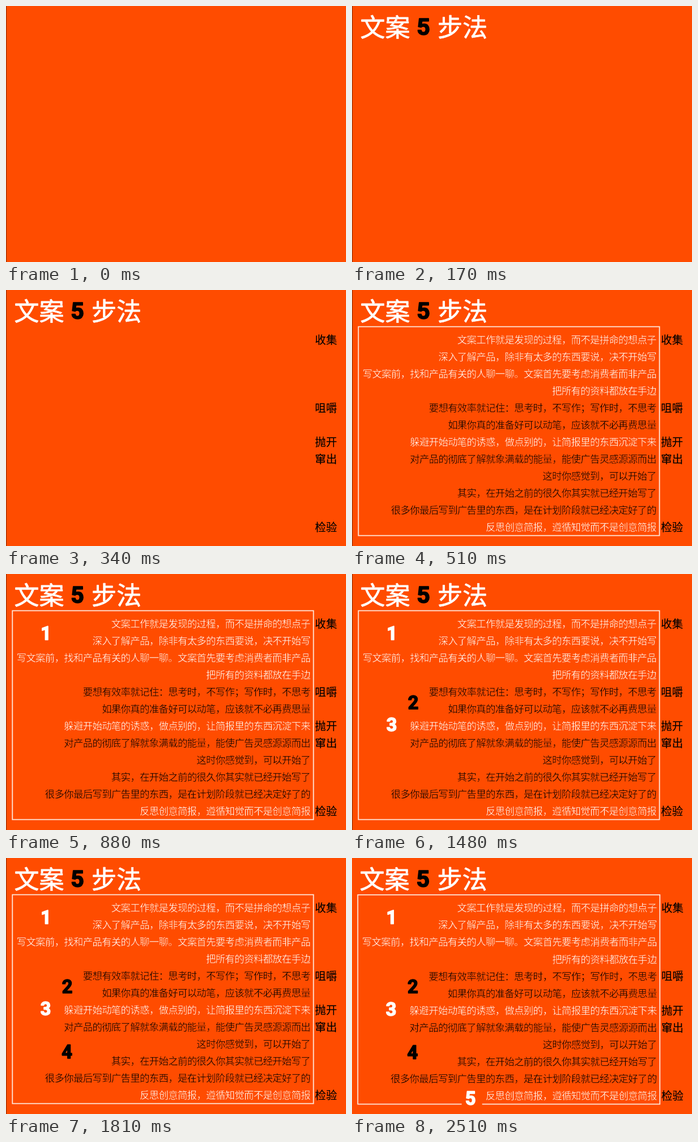
These frames come from a looping animation (600 px wide and 451 px high, 3.51 s). An HTML page:

```html
<!DOCTYPE html>
<html lang="zh-CN">
<head>
<meta charset="utf-8">
<style>
  html, body { margin: 0; width: 100%; height: 100%; overflow: hidden; background: #ff4c00; }
  svg { display: block; width: 600px; height: 451px; }
  text { font-family: "Noto Sans CJK SC", "Noto Sans CJK", sans-serif; stroke-linejoin: round; }
  .title { font-size: 44px; fill: #fff; stroke: #fff; stroke-width: .8; }
  .label { font-size: 19.4px; stroke: #000; stroke-width: .15; }
  /* An outline in the background colour thins the strokes */
  .row { font-size: 17.4px; letter-spacing: -.67px; text-anchor: end; stroke: #ff4c00; stroke-width: .4; }
  .digit { font-family: Roboto, sans-serif; font-weight: 700; text-anchor: middle; stroke-width: 1.6; }
</style>
</head>
<body>
<svg viewBox="0 0 600 451"></svg>
<script>
const LOOP = 3510, LAST = 2510;
const rows = [
  '文案工作就是发现的过程，而不是拼命的想点子',
  '深入了解产品，除非有太多的东西要说，决不开始写',
  '写文案前，找和产品有关的人聊一聊。文案首先要考虑消费者而非产品',
  '把所有的资料都放在手边',
  '要想有效率就记住：思考时，不写作；写作时，不思考',
  '如果你真的准备好可以动笔，应该就不必再费思量',
  '躲避开始动笔的诱惑，做点别的，让简报里的东西沉淀下来',
  '对产品的彻底了解就象满载的能量，能使广告灵感源源而出',
  '这时你感觉到，可以开始了',
  '其实，在开始之前的很久你其实就已经开始写了',
  '很多你最后写到广告里的东西，是在计划阶段就已经决定好了的',
  '反思创意简报，遵循知觉而不是创意简报'
];
const labels = { 0: '收集', 4: '咀嚼', 6: '抛开', 7: '窜出', 11: '检验' };
const isWhite = i => i < 4 || i === 6 || i === 11;
const rowY = i => 87.6 + 30 * i;

const svg = document.querySelector('svg');
const timed = [];

function add(tag, attrs, start, end = LOOP, parent = page) {
  const el = document.createElementNS('http://www.w3.org/2000/svg', tag);
  for (const k in attrs) el.setAttribute(k, attrs[k]);
  parent.append(el);
  timed.push({ el, start, end });
  return el;
}
function text(str, cls, x, y, start, color = '#000', extra = {}) {
  add('text', { class: cls, x, y, fill: color, ...extra }, start).textContent = str;
}
function digit(n, x, y, start, color, size = 32.5) {
  text(n, 'digit', x, y, start, color, { stroke: color, 'font-size': size });
}

add('rect', { width: 1, height: 451, fill: '#8c2a00' }, 0, LAST, svg);
const page = add('g', {}, 0, LOOP, svg);

text('文案', 'title', 14.5, 53.5, 170);
text('步法', 'title', 151, 53.5, 170);
digit(5, 126, 51.3, 170, '#000', 41);

for (const i in labels) text(labels[i], 'label', 545.3, rowY(+i) + 7.3, 340);

const frame = { fill: 'none', stroke: '#ffe6da', 'stroke-width': 1.8 };
add('path', { ...frame, d: 'M11.3 64.7H542.6V432.6H11.3Z' }, 510, LAST);
add('path', { ...frame, d: 'M194 432.6H11.3V64.7H542.6V432.6H230' }, LAST);
rows.forEach((r, i) => text(r, 'row', 537, rowY(i) + 6.5, 510, isWhite(i) ? '#fff' : '#000'));

digit(1, 70.7, 115.8, 880, '#fff');
digit(2, 108, 237.8, 1180, '#000');
digit(3, 70, 277.3, 1480, '#fff');
digit(4, 107.7, 352.8, 1810, '#000');
digit(5, 209.6, 433.6, LAST, '#fff');

function draw(now) {
  const t = now % LOOP;
  for (const { el, start, end } of timed)
    el.style.display = t >= start && t < end ? '' : 'none';
  // The closing view is a touch wider and taller
  page.setAttribute('transform', t < LAST ? '' : 'translate(-1.1 0) scale(1.0033 1.0025)');
}
const begin = performance.now();
function tick() {
  draw(performance.now() - begin);
  requestAnimationFrame(tick);
}
tick();
</script>
</body>
</html>
```
